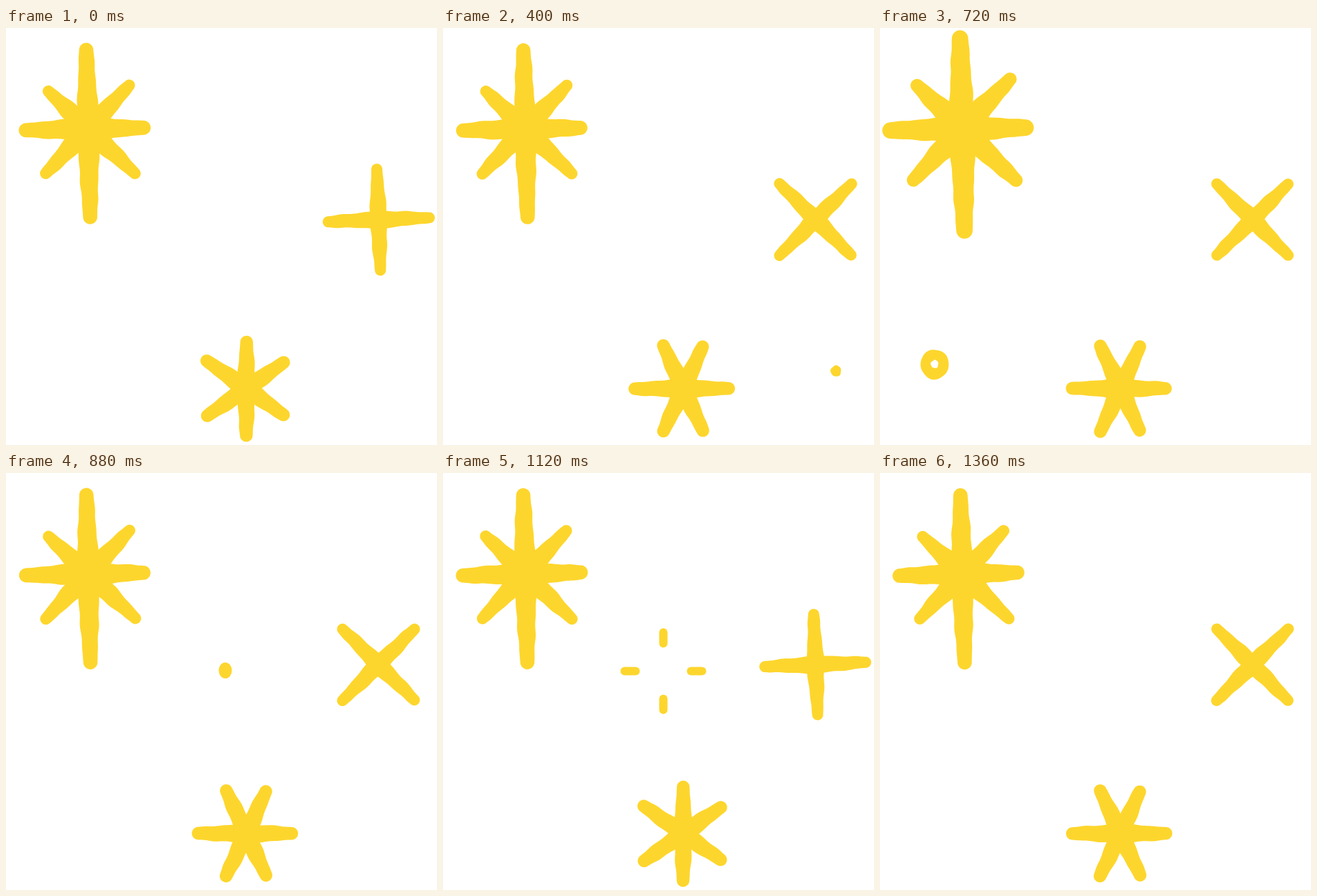
Recreate the animation shown at these times as an HTML page with a canvas. Size 623 by 603 pixels, loop 1.44 s.

```html
<!DOCTYPE html>
<html lang="en">
<head>
<meta charset="utf-8">
<title>Twinkling stars</title>
<style>
  html, body { margin: 0; width: 100%; height: 100%; overflow: hidden; background: #fff; }
  canvas { display: block; }
</style>
</head>
<body>
<canvas id="stage" width="623" height="603"></canvas>
<script>
const ctx = document.getElementById('stage').getContext('2d');
const { PI, sin, cos, abs, min, max, hypot, floor, ceil } = Math;
const STEP = 80, STEPS = 18;

function random(seed) {
  const v = sin(seed * 127.1 + 11.7) * 43758.5453;
  return v - floor(v);
}

// A tapered stroke from the hub with a round tip and a slightly uneven edge.
function arm(x, y, angle, reach, tipR, baseR, seed) {
  const shift = k => random(seed + k) - 0.5;
  const dx = reach * cos(angle) + shift(1), dy = reach * sin(angle) + shift(2);
  const length = hypot(dx, dy), ux = dx / length, uy = dy / length;
  const to = (along, side) => ctx.lineTo(x + ux * along - uy * side, y + uy * along + ux * side);
  const edge = (t, side) => {
    const along = t * length, phase = random(seed + side * 3) * 2 * PI;
    const rough = 0.4 * (sin(along / 9 + phase) + sin(along / 5 + phase * 2));
    to(along, side * (baseR + (tipR - baseR) * t + rough * min(1, (1 - t) * 5)));
  };
  const n = ceil(length / 3);
  ctx.beginPath();
  for (let i = 0; i <= n; i++) edge(i / n, -1);
  for (let a = -PI / 2; a < PI / 2; a += PI / 14) to(length + tipR * cos(a), tipR * sin(a));
  for (let i = n; i >= 0; i--) edge(i / n, 1);
  ctx.fill();
}

// Evenly turned arms; `spread` bends them towards the vertical.
function star(x, y, { count, turn, spread = 0, reach, tip, base, seed }) {
  for (let i = 0; i < count; i++) {
    const even = turn + i * 2 * PI / count;
    const angle = even + spread * sin(2 * even);
    arm(x, y, angle, reach(angle), tip(angle), base, seed * 31 + i * 7);
  }
}

// Long vertical arms, shorter diagonals, all a little uneven.
function bigStar(scale, seed) {
  star(118.7, 146, {
    count: 8, turn: -0.025, seed, base: 17 * scale,
    reach: a => scale * (95 - 18 * cos(2 * a) + 8 * cos(4 * a) + 6.5 * sin(a) - 4.7 * cos(3 * a)),
    tip: a => scale * (9.3 + cos(4 * a))
  });
}

function fourStar(turn, seed) {
  star(538.5, 277, { count: 4, turn, seed, base: 13, reach: () => 73, tip: () => 8 });
}

function sixStar(turn, seed) {
  star(347.3, 521.3, {
    count: 6, turn, seed, spread: 0.1, base: 14,
    reach: a => 67.5 - 2 * cos(a), tip: () => 9.2
  });
}

function blob(x, y, r, seed) {
  for (let i = 0; i <= 48; i++) {
    const a = i / 24 * PI;
    const k = r + 0.3 * (sin(3 * a + seed) + sin(5 * a + seed * 2));
    ctx[i ? 'lineTo' : 'moveTo'](x + k * cos(a), y + k * 1.06 * sin(a));
  }
}

// A dot swells into a ring and shrinks back over five steps.
function bubble(x, y, size, age, seed) {
  const fromPeak = abs(age - 2);
  if (fromPeak > 2) return;
  const outer = size * (1 - 0.32 * fromPeak);
  const hole = outer * (0.54 - 0.27 * fromPeak);
  ctx.beginPath();
  blob(x, y, outer, seed);
  if (hole > 0) blob(x, y - 0.5, hole, seed + 2);
  ctx.fill('evenodd');
}

// A dot opens into four dashes that fly apart.
function burst(x, y, age) {
  if (age < 0 || age > 4) return;
  if (age === 0) {
    ctx.beginPath();
    ctx.ellipse(x - 1.5, y - 1, 9.5, 11.5, 0, 0, 2 * PI);
    ctx.fill();
    return;
  }
  const half = 6;
  const near = max(0, 17 * (age - 1) + half), far = min(66, 8 + 18 * age) - half;
  ctx.lineWidth = 2 * half;
  ctx.lineCap = 'round';
  for (let a = 0; a < 2 * PI; a += PI / 2) {
    ctx.beginPath();
    ctx.moveTo(x + near * cos(a), y + near * sin(a));
    ctx.lineTo(x + far * cos(a), y + far * sin(a));
    ctx.stroke();
  }
}

function draw(now) {
  const step = floor(now / STEP) % STEPS;
  const even = step % 2 === 0;
  ctx.fillStyle = '#fff';
  ctx.fillRect(0, 0, 623, 603);
  ctx.fillStyle = ctx.strokeStyle = '#fdd62d';
  bigStar(step % 6 === 3 ? 1.15 : 1, step + 1);
  fourStar(even ? -0.04 : PI / 4, step + 41);
  sixStar(even ? PI / 6 : 0, step + 81);
  bubble(568, 496, 21, step - 1, step);
  bubble(79, 486.5, 30, step - 6, step);
  burst(318.5, 286.5, step - 11);
}

const start = performance.now();
function tick() {
  draw(performance.now() - start);
  requestAnimationFrame(tick);
}
tick();
</script>
</body>
</html>
```
